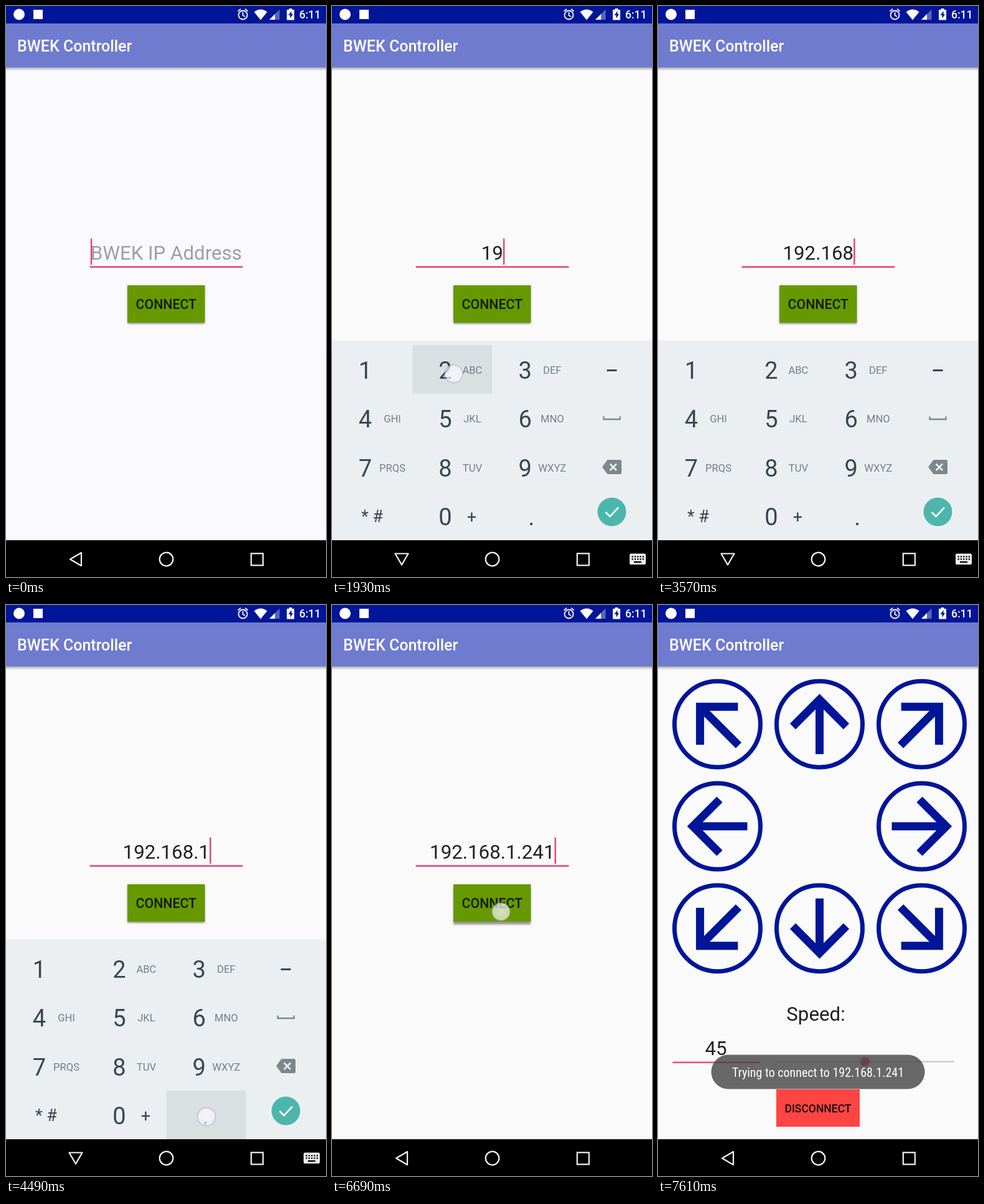
Animation, 514 px wide and 916 px high, one loop 7.99 s. Source, as an HTML page:

```html
<!DOCTYPE html>
<html lang="en">
<head>
<meta charset="utf-8">
<title>Controller app</title>
<style>
  html, body { margin: 0; width: 100%; height: 100%; overflow: hidden; background: #000; }
  svg { display: block; width: 100%; height: 100%; }
  text { font-family: Roboto, sans-serif; }
  .mid { text-anchor: middle; }
  .medium { font-weight: 500; }
  .big { font-size: 31.25px; fill: #212121; }
  .digit { font-size: 38px; fill: #37474f; }
  .letters { font-size: 16.6px; fill: #737f86; }
  .symbol { font-size: 27px; fill: #37474f; }
  #toastText { font-family: "Roboto Condensed", Roboto, sans-serif; font-stretch: 75%; font-size: 20px; fill: #fff; }
</style>
</head>
<body>
<svg viewBox="0 0 514 916" xmlns="http://www.w3.org/2000/svg">
  <defs>
    <linearGradient id="shade" x2="0" y2="1">
      <stop offset="0" stop-opacity=".34"/><stop offset="1" stop-opacity="0"/>
    </linearGradient>
    <radialGradient id="touch">
      <stop offset="0" stop-color="#fff" stop-opacity=".72"/>
      <stop offset=".82" stop-color="#f6f6fc" stop-opacity=".68"/>
      <stop offset=".9" stop-color="#9fa4cf" stop-opacity=".55"/>
      <stop offset="1" stop-color="#9fa4cf" stop-opacity="0"/>
    </radialGradient>
    <filter id="soft" x="-20%" y="-20%" width="140%" height="150%"><feGaussianBlur stdDeviation="1.6"/></filter>
    <g id="appBar">
      <rect y="98" width="514" height="6" fill="url(#shade)"/>
      <rect y="28" width="514" height="70.5" fill="#6f7bcf"/>
      <text class="medium" x="18" y="73" font-size="25" fill="#fff">BWEK Controller</text>
    </g>
    <g id="arrow" fill="none" stroke="#001597">
      <circle r="69" stroke-width="7"/>
      <path d="M-43 3.5L0-39.5L43 3.5M0-39V48" stroke-width="13"/>
    </g>
  </defs>

  <rect id="page" width="514" height="916"/>
  <use href="#appBar"/>
  <text id="field" class="mid big" x="257.3" y="407"></text>
  <rect x="134.5" y="417.3" width="246" height="2.6" fill="#e5467f"/>
  <rect id="caret" y="373" width="2.5" height="42" fill="#e5467f"/>
  <rect id="buttonShade" x="195" y="450" width="124" height="60" opacity=".4" filter="url(#soft)"/>
  <rect x="195" y="448" width="124.5" height="60" fill="#669900"/>
  <text class="mid medium" x="257.3" y="486" font-size="21.3" fill="#101a03">CONNECT</text>

  <g id="keyboard">
    <rect y="536.5" width="514" height="325" fill="#eceff1"/>
    <rect id="pressed" width="128" height="78" fill="#dadfe2"/>
    <g id="keys"></g>
    <text class="symbol" x="47" y="828">* #</text>
    <text class="symbol mid" x="224.5" y="829">+</text>
    <rect x="441.5" y="583" width="16" height="3" fill="#37474f"/>
    <path d="M436.5 658.500V663H462.500V658.500" fill="none" stroke="#7d888d" stroke-width="2.4"/>
    <path d="M434 739.500L442.500 728H463Q465 728 465 730V749Q465 751 463 751H442.500Z" fill="#7d888d"/>
    <path d="M446.500 734.500L457 745M457 734.500L446.500 745" stroke="#eceff1" stroke-width="2.6"/>
    <circle cx="449.500" cy="811.500" r="23" fill="#4db6ac"/>
    <path d="M439.500 812L446.500 819L460 804.500" fill="none" stroke="#fff" stroke-width="2.6"/>
  </g>

  <g id="panel">
    <rect y="28" width="514" height="888" fill="#fafafa"/>
    <use href="#appBar"/>
    <g id="arrows"></g>
    <text class="mid big" x="253.500" y="667">Speed:</text>
    <text class="mid big" x="93" y="722">45</text>
    <rect x="23.500" y="732.500" width="139.500" height="2.600" fill="#f2506c"/>
    <rect x="188" y="731.500" width="288" height="2.200" fill="#c9c9c9"/>
    <circle cx="332.500" cy="732.800" r="7.500" fill="#ff4081"/>
    <rect x="190" y="777" width="134" height="60" fill="#ff4444"/>
    <text class="mid medium" x="257" y="814" font-size="17.500" fill="#210909">DISCONNECT</text>
  </g>

  <g id="toast">
    <rect x="85.500" y="721.500" width="343" height="55" rx="27.500" fill="#444" fill-opacity=".8"/>
    <text id="toastText" class="mid" x="257" y="757">Trying to connect to 192.168.1.241</text>
  </g>

  <g id="statusBar" fill="#fff">
    <rect width="514" height="28" fill="#001597"/>
    <circle cx="21" cy="13.500" r="9"/>
    <rect x="44" y="6" width="15" height="15"/>
    <g fill="none" stroke="#fff" stroke-width="1.800">
      <circle cx="380.500" cy="14.500" r="7"/>
      <path d="M380.500 10V15L384 17M372.500 8.500L377 4.800M388.500 8.500L384 4.800"/>
    </g>
    <path d="M398.500 9.500Q409 1.500 419.500 9.500L409 22.500Z"/>
    <path d="M439.500 5.500V22H423Z" opacity=".35"/>
    <path d="M432 13V22H423Z"/>
    <path d="M451 6H454.500V4H459.500V6H463V22.500H451Z"/>
    <path d="M458.500 8L453.500 14.800H456.500V20L461 13H458.500Z" fill="#001597"/>
    <text class="medium" x="471" y="20" font-size="17.500">6:11</text>
  </g>
  <g id="navBar" fill="none" stroke="#f2f2f2" stroke-width="2.200">
    <rect y="857" width="514" height="59" fill="#000" stroke="none"/>
    <path id="back" d="M-9 0L9-10.500V10.500Z" stroke-linejoin="round"/>
    <circle cx="257.500" cy="887.500" r="10.800"/>
    <rect x="393.800" y="878.300" width="19" height="19"/>
    <g id="imeIcon" stroke="none">
      <rect x="478" y="878.500" width="26" height="17.500" rx="2" fill="#eee"/>
      <path d="M481.500 883.300H501M481.500 887.300H501" stroke="#000" stroke-width="2.300" stroke-dasharray="2.300 2"/>
      <path d="M485 892H497" stroke="#000" stroke-width="2.300"/>
    </g>
  </g>
  <circle id="dot" r="16" fill="url(#touch)"/>
</svg>
<script>
const LOOP = 7990;
const HINT = 'BWEK IP Address';
const KEYS = ['1', '2ABC', '3DEF', '4GHI', '5JKL', '6MNO', '7PRQS', '8TUV', '9WXYZ', '', '0', '.'];

// Each keystroke: character, finger down, finger up (ms)
const STROKES = [
  ['1', 1230, 1380], ['9', 1540, 1700], ['2', 1850, 2000], ['.', 2310, 2470],
  ['1', 2780, 2930], ['6', 3090, 3240], ['8', 3340, 3490], ['.', 3720, 3880],
  ['1', 4030, 4180], ['.', 4410, 4550], ['2', 4640, 4790], ['4', 4860, 5030], ['1', 5110, 5260]
].map(([char, down, up]) => ({ char, down, up }));

// Touches outside the typing: x, y, down, up
const TAPS = [[257, 396, 300, 450], [449, 812, 5720, 5800], [271.5, 492, 6690, 6850]];

const el = {};
document.querySelectorAll('[id]').forEach(node => el[node.id] = node);

const clamp = v => Math.max(0, Math.min(1, v));
const ramp = (t, from, to) => clamp((t - from) / (to - from));
const easeOut = p => 1 - (1 - p) ** 2;
const show = (node, on) => node.setAttribute('visibility', on ? 'visible' : 'hidden');
const move = (node, x, y, extra = '') => node.setAttribute('transform', `translate(${x} ${y})${extra}`);

function buildKeys() {
  el.keys.innerHTML = KEYS.map((key, i) => {
    const x = 128.4 * (i % 3), y = 78.3 * Math.floor(i / 3);
    const digitX = key === '.' ? 63.5 : 53.5;
    return `<text class="digit mid" x="${x + digitX}" y="${y + 598}">${key.slice(0, 1)}</text>` +
      `<text class="letters mid" x="${x + 97}" y="${y + 590}">${key.slice(1)}</text>`;
  }).join('');
}

function buildArrows() {
  const angles = [-45, 0, 45, -90, null, 90, -135, 180, 135];
  el.arrows.innerHTML = angles.map((angle, i) => angle === null ? '' :
    `<use href="#arrow" transform="translate(${95.5 + 164 * (i % 3)} ${191.3 + 163.7 * Math.floor(i / 3)}) rotate(${angle})"/>`
  ).join('');
}

function keyCell(char) {
  const i = KEYS.findIndex(key => key[0] === char);
  return { col: i % 3, row: Math.floor(i / 3) };
}

function touchAt(t) {
  const tap = TAPS.find(([, , down, up]) => t >= down && t < up);
  if (tap) return tap;
  const stroke = STROKES.find(s => t >= s.down && t < s.up);
  if (!stroke) return null;
  const { col, row } = keyCell(stroke.char);
  return [[60, 195.5, 322][col], 590 + 77 * row];
}

function drawField(t) {
  const typed = STROKES.filter(s => t >= s.up);
  const value = typed.map(s => s.char).join('');
  el.field.textContent = value || HINT;
  el.field.setAttribute('fill-opacity', value ? 1 : 0.42);
  const half = el.field.getComputedTextLength() / 2;
  el.caret.setAttribute('x', 257.3 + (value ? half : -half));
  const blinkStart = typed.length === STROKES.length ? 5220 : t;
  show(el.caret, Math.floor((t - blinkStart) / 500) % 2 === 0);
}

function drawKeyboard(t) {
  const open = t >= 530 && t < 5960;
  const up = easeOut(ramp(t, 450, 680)) * (1 - ramp(t, 5800, 6050) ** 2);
  show(el.keyboard, up > 0);
  move(el.keyboard, 0, 321 * (1 - up));
  show(el.imeIcon, open);
  move(el.back, 112, 887.5, open ? ' rotate(-90)' : '');

  const stroke = STROKES.findLast(s => t >= s.down);
  const strength = stroke ? 1 - ramp(t, stroke.up, stroke.up + 80) : 0;
  el.pressed.setAttribute('opacity', strength);
  if (stroke) {
    const { col, row } = keyCell(stroke.char);
    el.pressed.setAttribute('x', 1 + 128.2 * col);
    el.pressed.setAttribute('y', 544 + 78.3 * row);
  }
}

function draw(t) {
  el.page.setAttribute('fill', t < 600 ? '#faf9fe' : '#fafafa');
  drawField(t);
  drawKeyboard(t);
  move(el.buttonShade, 0, t >= 6690 && t < 6920 ? 2.5 : 0);

  const enter = ramp(t, 7150, 7460);
  show(el.panel, enter > 0);
  el.panel.setAttribute('opacity', ramp(t, 7150, 7350));
  move(el.panel, 0, 70 * (1 - easeOut(enter)));
  el.toast.setAttribute('opacity', ramp(t, 6860, 7150));

  const touch = touchAt(t);
  show(el.dot, touch);
  if (touch) move(el.dot, touch[0], touch[1]);
}

buildKeys();
buildArrows();
// Without a condensed face, use a smaller regular one
if (el.toastText.getComputedTextLength() > 292) el.toastText.style.fontSize = '17.9px';

const start = performance.now();
function tick(now) {
  draw(Math.max(0, now - start) % LOOP);
  requestAnimationFrame(tick);
}
draw(0);
requestAnimationFrame(tick);
</script>
</body>
</html>
```
